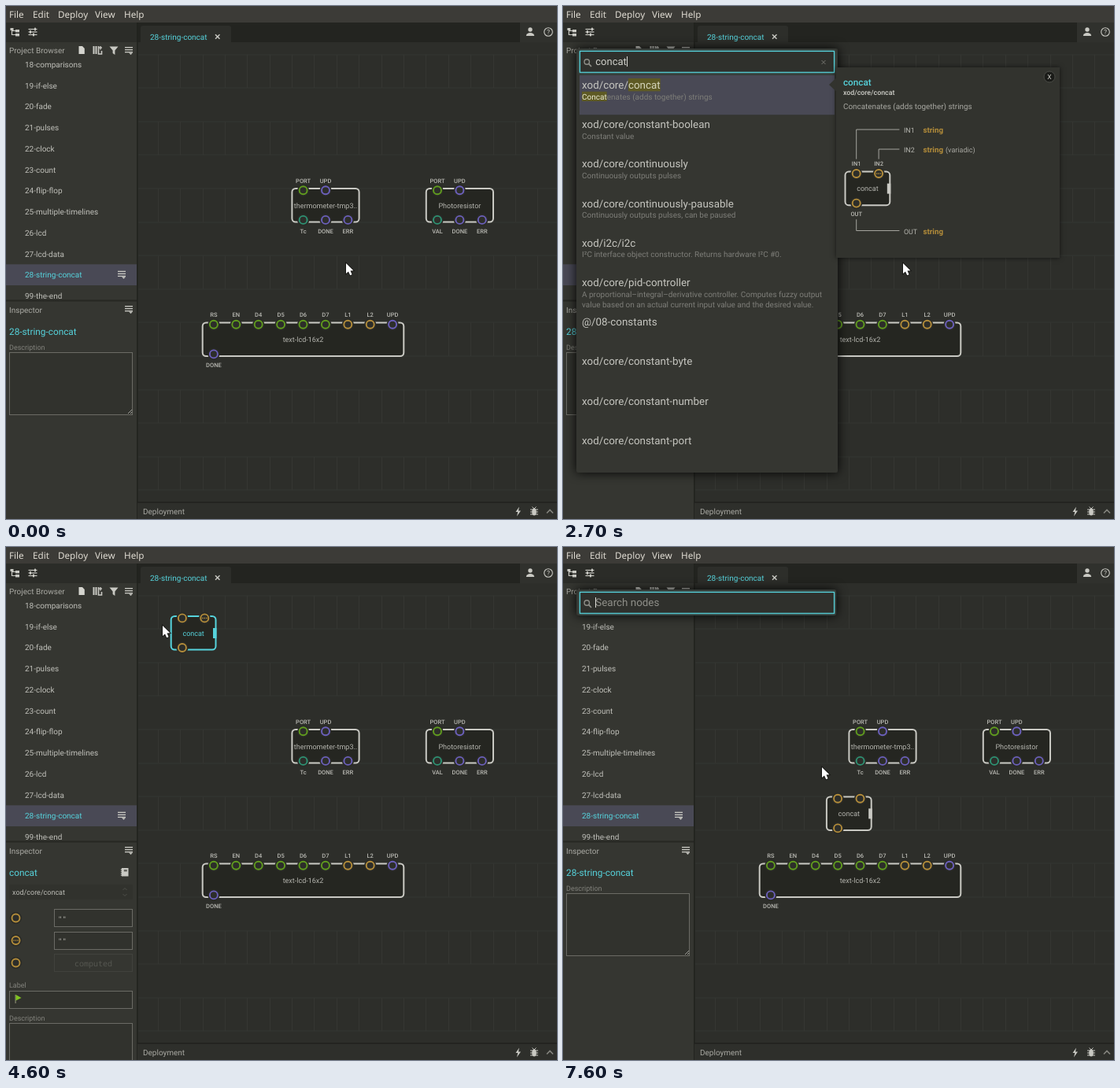
An HTML page with a canvas for the animation above (8000 ms loop, 700x652 px).

```html
<!DOCTYPE html>
<html lang="en">
<head>
<meta charset="utf-8">
<title>Patch editor: adding a node</title>
<style>
html, body { margin: 0; width: 100%; height: 100%; overflow: hidden; background: #2d2e2a; }
canvas { display: block; width: 700px; height: 652px; }
</style>
</head>
<body>
<canvas id="stage" width="700" height="652"></canvas>
<script>
const g = document.getElementById('stage').getContext('2d');
g.textRendering = 'geometricPrecision';
const LOOP = 8000, STEP = 100, SLOT = 28.4, NODE_H = 42.6, ROW = 50.2;
const BG = '#2d2e2a', SIDE = '#353631', HELP = '#32332e', CYAN = '#56d3dc', LIGHT = '#c9c9c3', DIM = '#82827c';
const PIN = { port: '#609c1e', pulse: '#6c60bd', number: '#2e9474', string: '#b48d3a', boolean: '#8064a8' };
const SANS = 'Roboto, "Open Sans", sans-serif', MONO = '"Noto Sans Mono", "DejaVu Sans Mono", monospace';

// ---- drawing helpers ----
function rect(x, y, w, h, color) { g.fillStyle = color; g.fillRect(x, y, w, h); }
function frame(x, y, w, h, color) {
  g.strokeStyle = color; g.lineWidth = 1;
  g.strokeRect(x + .5, y + .5, w - 1, h - 1);
}
function line(points, color, width = 1) {
  g.strokeStyle = color; g.lineWidth = width;
  g.beginPath();
  points.forEach(([x, y]) => g.lineTo(x, y));
  g.stroke();
}
function shape(points, color) {
  g.fillStyle = color;
  g.beginPath();
  points.forEach(([x, y]) => g.lineTo(x, y));
  g.fill();
}
function disc(x, y, r, fill, stroke, width = 1) {
  g.beginPath(); g.arc(x, y, r, 0, 7);
  if (fill) { g.fillStyle = fill; g.fill(); }
  if (stroke) { g.strokeStyle = stroke; g.lineWidth = width; g.stroke(); }
}
function shadow(blur, color) { g.shadowBlur = blur; g.shadowColor = color; }
// y is the middle of the capitals
function text(s, x, y, size, color, { align = 'left', weight = 400, font = SANS } = {}) {
  g.font = `${weight} ${size}px ${font}`;
  g.textAlign = align;
  g.fillStyle = color;
  g.fillText(s, x, y + size * .355);
  return g.measureText(s).width;
}
function marked(s, x, y, size, color, hot, query) {
  s.split(new RegExp(`(${query})`, 'gi')).forEach((part, i) => {
    const hit = i % 2;
    g.font = `400 ${size}px ${SANS}`;
    if (hit) rect(x, y - size * .62, g.measureText(part).width, size * 1.22, '#5e5a24');
    x += text(part, x, y, size, hit ? hot : color);
  });
}

// ---- timing helpers ----
function at(keys, t) {
  let i = 0;
  while (i < keys.length - 1 && keys[i + 1][0] <= t) i++;
  const a = keys[i], b = keys[i + 1];
  if (!b) return a.slice(1);
  const k = (t - a[0]) / (b[0] - a[0]);
  return [a[1] + (b[1] - a[1]) * k, a[2] + (b[2] - a[2]) * k];
}
const cursorPath = [
  [0, 432, 327], [3500, 432, 327], [3600, 325, 255], [3700, 325, 255], [3800, 268, 188],
  [4000, 203, 103], [4100, 199, 100], [4700, 199, 100], [5200, 238, 110], [5300, 238, 110],
  [5400, 241, 119], [5600, 352, 285], [5700, 399, 324], [5800, 408, 342], [5900, 398, 345],
  [6200, 365, 340], [6300, 361, 334], [6500, 341, 300], [6700, 329, 280]
];
const nodePath = [
  [0, 209.7, 88], [5300, 209.7, 88], [5400, 217, 102], [5600, 336, 278], [5700, 375.3, 319.6],
  [5800, 379, 323], [5900, 369, 322], [6100, 341, 318.5], [6200, 334.9, 317.4]
];
const typing = [[1700, 'c'], [1800, 'co'], [2100, 'con'], [2200, 'conc'], [2500, 'conca'], [2700, 'concat']];

// ---- search data ----
const item = (path, desc = '', ins = [], outs = [], w = 284, h = 242) => ({ path, desc, ins, outs, w, h });
const top4 = [
  item('xod/core/concat', 'Concatenates (adds together) strings',
    [['IN1', 'string'], ['IN2', 'string', '(variadic)']], [['OUT', 'string']]),
  item('xod/core/constant-boolean', 'Constant value', [], [['VAL', 'boolean', '', 'Constant value']], 250, 188),
  item('xod/core/continuously', 'Continuously outputs pulses'),
  item('xod/core/continuously-pausable', 'Continuously outputs pulses, can be paused',
    [['EN', 'boolean']], [['TICK', 'pulse']], 284, 228)
];
const consoleLog = item('xod/core/console-log', 'Outputs a line of text to the board standard debug interface');
const [pid, eight, byte, number, port] = [
  item('xod/core/pid-controller', 'A proportional–integral–derivative controller. Computes fuzzy output\nvalue based on an actual current input value and the desired value.'),
  item('@/08-constants'), item('xod/core/constant-byte'), item('xod/core/constant-number'), item('xod/core/constant-port')
];
const broad = [...top4,
  item('xod/math/clip', 'Clips an input value so that the value is always inside a [MIN, MAX]\nrange.'),
  item('xod/math/cos', 'Calculates cosine of an angle.'),
  item('xod/math/cube', 'Computes the cube (i.e. x³) of an input value.'),
  item('xod/core/clock', 'Outputs pulses at regular intervals'), consoleLog, byte];
const middle = [...top4, consoleLog, pid, eight, byte, number, port];
const narrow = [...top4,
  item('xod/i2c/i2c', 'I²C interface object constructor. Returns hardware I²C #0.'),
  pid, eight, byte, number, port];

// ---- nodes ----
function pin(x, y, type, dots) {
  disc(x, y, 7.6, '#2a2b27');
  disc(x, y, 5, BG, PIN[type], 1.9);
  if (dots) for (const d of [-2.4, 0, 2.4]) rect(x + d - .7, y - .7, 1.4, 1.4, PIN[type]);
}
function node(x, y, slots, label, ins, outs, { color = LIGHT, labels = true, side = false, dots = false, lift = false } = {}) {
  const w = slots * SLOT;
  if (lift) shadow(9, 'rgba(0,0,0,.75)');
  g.beginPath(); g.roundRect(x, y, w, NODE_H, 4.5);
  g.fillStyle = '#252621'; g.fill();
  shadow(0, 'transparent');
  g.strokeStyle = color; g.lineWidth = 2; g.stroke();
  const row = (pins, py, ly) => pins.forEach(([name, type], i) => {
    const px = x + SLOT * (i + .5);
    pin(px, py, type, dots && i === 1);
    if (labels) text(name, px, ly, 7.5, '#b9b9b3', { align: 'center', weight: 500 });
  });
  row(ins, y + 2.4, y - 10);
  row(outs, y + NODE_H - 2.6, y + NODE_H + 11.6);
  if (side) rect(x + w - 3.5, y + 15, 4.5, 13, color);
  text(label, x + w / 2, y + 21.6, 9, color === CYAN ? CYAN : '#b5b5af', { align: 'center' });
}
const list = (names, type) => names.split(' ').map(n => [n, type]);
const concatIns = list('IN1 IN2', 'string'), concatOut = list('OUT', 'string');

// ---- icons ----
function menuIcon(x, y) {
  for (const d of [-4, -1, 2]) rect(x - 5, y + d, 10, 1.3, LIGHT);
  shape([[x, y + 3.6], [x + 5, y + 3.6], [x + 2.5, y + 6]], LIGHT);
}
function fileIcon(x, y) { shape([[x - 3.5, y - 5], [x + 1, y - 5], [x + 3.8, y - 2], [x + 3.8, y + 5], [x - 3.5, y + 5]], '#d4d4ce'); }
function icons() {
  line([[7.5, 29], [7.5, 36.5], [12, 36.5]], LIGHT, 1.2);
  line([[7.5, 31.5], [12, 31.5]], LIGHT, 1.2);
  rect(5.5, 28, 4, 3, LIGHT); rect(12, 30, 5, 3.4, LIGHT); rect(12, 35, 5, 3.4, LIGHT);
  [[29.5, 37], [33, 31], [36.5, 35]].forEach(([y, x]) => {
    rect(28.5, y - .6, 11, 1.2, LIGHT); rect(x - 1, y - 1.8, 2, 3.6, LIGHT);
  });
  fileIcon(96, 56);
  for (const x of [110.5, 113.5]) rect(x, 51, 2, 10, LIGHT);
  line([[117.5, 51], [117.5, 61], [121.5, 61], [121.5, 57]], LIGHT, 1.6);
  line([[117.5, 53], [122, 53]], LIGHT, 1.4); line([[120, 51], [120, 55.5]], LIGHT, 1.4);
  shape([[131.5, 51.5], [142.5, 51.5], [138.4, 56.5], [138.4, 62], [135.6, 60], [135.6, 56.5]], LIGHT);
  menuIcon(156, 56);
  disc(666, 30, 2.7, LIGHT);
  g.beginPath(); g.ellipse(666, 38, 5.2, 4, 0, Math.PI, 0); g.fill();
  disc(689, 33, 5.3, null, LIGHT, 1.1);
  text('?', 689, 33.2, 8.5, LIGHT, { align: 'center' });
}
function footer() {
  rect(167, 630, 533, 22, '#2e2f2b'); rect(167, 630, 533, 1.5, '#20211e');
  text('Deployment', 174, 642.5, 10, '#a9a9a3');
  shape([[652, 636.5], [647.5, 643], [650.3, 643], [649, 648.5], [654, 641.5], [651, 641.5]], LIGHT);
  g.fillStyle = LIGHT; g.beginPath(); g.ellipse(671, 643, 2.8, 4.6, 0, 0, 7); g.fill();
  for (const d of [-2.5, .5, 3.5]) line([[666, 642.5 + d], [676, 642.5 + d]], LIGHT, 1);
  line([[668.5, 636.5], [671, 639], [673.5, 636.5]], LIGHT, 1);
  line([[687, 644.5], [691, 640.5], [695, 644.5]], '#85857f', 1.6);
}

// ---- workspace ----
function workspace() {
  rect(0, 0, 700, 652, BG);
  for (let y = 61.6; y < 630; y += 2 * NODE_H) {
    for (const e of [0, NODE_H]) rect(168, Math.round(y + e) - .5, 532, 1, '#353632');
    for (let x = 192.7; x < 700; x += SLOT) rect(Math.round(x), y, 1, NODE_H, '#353632');
  }
  node(363.4, 231.9, 3, 'thermometer-tmp3..', [['PORT', 'port'], ['UPD', 'pulse']],
    [['Tc', 'number'], ...list('DONE ERR', 'pulse')]);
  node(533.8, 231.9, 3, 'Photoresistor', [['PORT', 'port'], ['UPD', 'pulse']],
    [['VAL', 'number'], ...list('DONE ERR', 'pulse')]);
  node(249.7, 402.4, 9, 'text-lcd-16x2',
    [...list('RS EN D4 D5 D6 D7', 'port'), ...list('L1 L2', 'string'), ['UPD', 'pulse']], [['DONE', 'pulse']]);
}
function newNode(t, picked) {
  const [x, y] = at(nodePath, t);
  const drag = t >= 5400 && t < 6200;
  if (drag) {
    const snap = (v, from, pitch) => from + Math.round((v - from) / pitch) * pitch;
    g.globalAlpha = .6;
    g.fillStyle = '#4aa7ad';
    g.beginPath();
    g.roundRect(snap(x - 3, 363.4, SLOT), snap(y, 317.4, 2 * NODE_H), 2 * SLOT, NODE_H, 4); g.fill();
    g.globalAlpha = 1;
  }
  node(x, y, 2, 'concat', concatIns, concatOut,
    { color: picked ? CYAN : LIGHT, labels: false, side: true, dots: picked, lift: drag });
}
function chrome() {
  rect(0, 0, 700, 21, '#3c3b37');
  [['File', 4], ['Edit', 34], ['Deploy', 66], ['View', 113], ['Help', 150]].forEach(([s, x]) =>
    text(s, x, 10.5, 11.7, '#dfdbd2', { font: '"Noto Sans", "Open Sans", sans-serif' }));
  rect(0, 21, 700, 25, '#232420');
  rect(653, 21, 47, 25, '#30312d');
  g.fillStyle = BG; g.beginPath(); g.roundRect(171, 25, 115, 22, [3, 3, 0, 0]); g.fill();
  text('28-string-concat', 183, 39.5, 10, CYAN);
  line([[266, 36.3], [271.5, 41.8]], LIGHT, 1.5); line([[271.5, 36.3], [266, 41.8]], LIGHT, 1.5);
}
const tree = ['18-comparisons', '19-if-else', '20-fade', '21-pulses', '22-clock', '23-count', '24-flip-flop',
  '25-multiple-timelines', '26-lcd', '27-lcd-data', '28-string-concat', '99-the-end'];
function field(y, h) { rect(4, y, 157, h, '#31322d'); frame(4, y, 157, h, '#6b6b65'); }
function sidebar(picked) {
  rect(0, 21, 166, 25, '#2b2c28');
  rect(0, 46, 166, 606, SIDE);
  rect(166, 21, 1.6, 631, '#22231f');
  text('Project Browser', 4, 56.5, 10, '#a9a9a3');
  g.save();
  g.beginPath(); g.rect(0, 66, 166, 307.5); g.clip();
  tree.forEach((name, i) => {
    const y = 74.5 + 26.72 * i, on = i === 10;
    if (on) { rect(0, y - 13.4, 166, 26.7, '#494955'); menuIcon(147, y - 1); }
    text(name, 24, y, 10, on ? CYAN : '#c0c0ba');
  });
  g.restore();
  rect(0, 373.5, 166, 2, '#262723');
  text('Inspector', 4, 386, 10, '#a9a9a3');
  menuIcon(156, 385);
  text(picked ? 'concat' : '28-string-concat', 4, 413.5, 11.8, CYAN);
  if (!picked) {
    text('Description', 4, 433.5, 9, DIM);
    field(440, 80);
    line([[155, 518], [160, 513]], '#a0a09a'); line([[158, 518], [160, 516]], '#a0a09a');
    return;
  }
  rect(147, 408, 8.5, 10.5, LIGHT);
  for (let i = 0; i < 4; i++) rect(145.8, 409.2 + i * 2.4, 2.4, 1.2, LIGHT);
  rect(149.8, 410, 4, 2.5, '#62625d');
  rect(4, 429, 157, 19, '#31322d');
  text('xod/core/concat', 8, 438.5, 9, '#bdbdb7');
  line([[148.5, 436], [151, 433.5], [153.5, 436]], '#4f504a');
  line([[148.5, 441], [151, 443.5], [153.5, 441]], '#4f504a');
  [471.5, 500, 528.5].forEach((y, i) => {
    pin(12.5, y, 'string', i === 1);
    rect(61, y - 11.5, 100, 23, i < 2 ? '#31322d' : SIDE);
    frame(61, Math.round(y - 11.5), 100, 23, i < 2 ? '#6b6b65' : '#41423d');
    if (i < 2) text('""', 66, y + 1, 9, '#bdbdb7', { font: MONO });
    else text('computed', 111, y + .5, 10, '#565751', { font: MONO, align: 'center' });
  });
  text('Label', 4, 557, 9, DIM);
  field(564, 23);
  rect(11.5, 569, 1.2, 11, '#8a8a72');
  shape([[12.5, 569], [19.5, 573], [12.5, 576.5]], '#7fc41f');
  text('Description', 4, 599, 9, DIM);
  field(605, 60);
}

// ---- search overlay ----
function search(t, query) {
  const open = query !== '', w = open ? 332 : 330;
  shadow(t === 1000 ? 9 : 14, 'rgba(0,0,0,.95)');
  g.fillStyle = SIDE;
  g.beginPath(); g.roundRect(17, 54, w, open ? 539 : 33, 2);
  g.fill();
  shadow(3, 'rgba(86,211,220,.5)');
  rect(21, 57, 324, 27.5, '#2f302c');
  shadow(0, 'transparent');
  rect(21, 57, 324, 27.5, '#2f302c');
  g.strokeStyle = CYAN; g.lineWidth = 1.2; g.strokeRect(21.5, 57.5, 323, 26.8);
  disc(30.3, 71, 3.2, null, '#8e8e88', 1.4);
  line([[32.6, 73.4], [36, 77]], '#8e8e88', 1.8);
  const len = text(open ? query : 'Search nodes', 41.3, 70.3, open ? 13 : 13.4, open ? '#cfcfc9' : '#8f8f89');
  if (t < 3100 || t >= 3800) rect(Math.round(open ? 41 + len : 41), 64, 1, 13, '#dcdcd6');
  if (!open) return;

  line([[328.5, 69], [333.5, 74]], '#75756f', 1); line([[333.5, 69], [328.5, 74]], '#75756f', 1);
  const rows = query.length < 3 ? broad : query === 'concat' ? narrow : middle;
  const hover = t >= 3800;
  const sel = !hover || t >= 4100 ? 0 : t < 3900 ? 3 : 1;
  rows.forEach((r, i) => {
    const y = 88 + ROW * i;
    if (i === sel) rect(21, y, hover ? 316 : 324, ROW, '#494955');
    r.desc.split('\n').forEach((s, k) => marked(s, 24, y + 27 + 13 * k, 10, '#7e7e79', '#eeeed6', query));
    marked(r.path, 24, y + 12.3, 13.4, '#c6c6c0', '#d6d6bc', query);
  });
  if (hover) { g.fillStyle = '#777771'; g.beginPath(); g.roundRect(337, 89, 6, 328, 3); g.fill(); }
  if (t >= 1900) help(rows[sel], 78 + ROW * sel);
}
function help(r, y) {
  const name = r.path.split('/').pop();
  y = Math.round(y);
  shadow(6, 'rgba(0,0,0,.6)');
  rect(347, y, r.w, r.h, HELP);
  shadow(0, 'transparent');
  shape([[347.5, y + 13], [338, y + 22], [347.5, y + 31]], HELP);
  disc(347 + r.w - 13, y + 12, 7, '#1b1c19', '#4a4b46');
  text('X', 347 + r.w - 13, y + 12.3, 8.5, LIGHT, { align: 'center' });
  text(name, 356, y + 18.5, 11.7, CYAN, { weight: 500 });
  text(r.path, 356, y + 32, 8.8, '#d0d0ca', { weight: 500 });
  text(r.desc, 356, y + 49.5, 9.9, '#a8a8a2');
  const n = Math.max(r.ins.length, r.outs.length), ny = y + (r.ins.length ? 82.6 + 25 * r.ins.length : 66.8);
  const px = i => 358.5 + SLOT * (i + .5);
  const end = 400 + SLOT * (n - 1);
  function row([label, type, extra, note], i, ly, from) {
    line([[px(i), from], [px(i), ly - 1], [end - 1, ly - 1]], '#a4a49e');
    text(label, end + (n > 1 ? 4.5 : -1), ly, 8.9, '#b5b5af');
    const tx = end + (n > 1 ? 29 : 24);
    const tw = text(type, tx, ly, 9.8, PIN[type], { weight: 700 });
    if (type === 'boolean') line([[tx, ly + .5], [tx + tw, ly + .5]], PIN.boolean);
    if (extra) text(extra, tx + tw + 3, ly, 9, '#a8a8a2');
    if (note) text(note, tx, ly + 14, 9.9, '#a8a8a2');
  }
  r.ins.forEach((p, i) => row(p, i, y + 80 + 25 * i, ny - 16));
  r.outs.forEach((p, i) => row(p, i, ny + NODE_H + 33.3, ny + NODE_H + 18));
  node(358.5, ny, n, n > 1 ? name : 'con…', r.ins, r.outs, { side: n > 1, dots: true });
}

function cursor(t) {
  const [x, y] = at(cursorPath, t);
  g.save();
  g.translate(x, y);
  g.beginPath();
  [[0, 0], [0, 13], [3, 10.4], [5.2, 15.2], [7.6, 14.2], [5.5, 9.6], [9.4, 9.3]].forEach(p => g.lineTo(...p));
  g.closePath();
  g.strokeStyle = '#141412'; g.lineWidth = 1.6; g.stroke();
  g.fillStyle = '#fff'; g.fill();
  g.restore();
}

function draw(now) {
  const t = Math.floor((now % LOOP) / STEP) * STEP;
  const picked = t >= 4600 && t < 7200;
  workspace();
  if (t >= 4600) newNode(t, picked);
  chrome();
  sidebar(picked);
  footer();
  icons();
  if (t >= 1000 && t < 4600 || t >= 7600) {
    const typed = t < 4600 ? typing.filter(k => k[0] <= t).pop() : null;
    search(t, typed ? typed[1] : '');
  }
  cursor(t);
}

let start;
function tick(now) {
  start ??= now;
  draw(now - start);
  requestAnimationFrame(tick);
}
requestAnimationFrame(tick);
</script>
</body>
</html>
```
